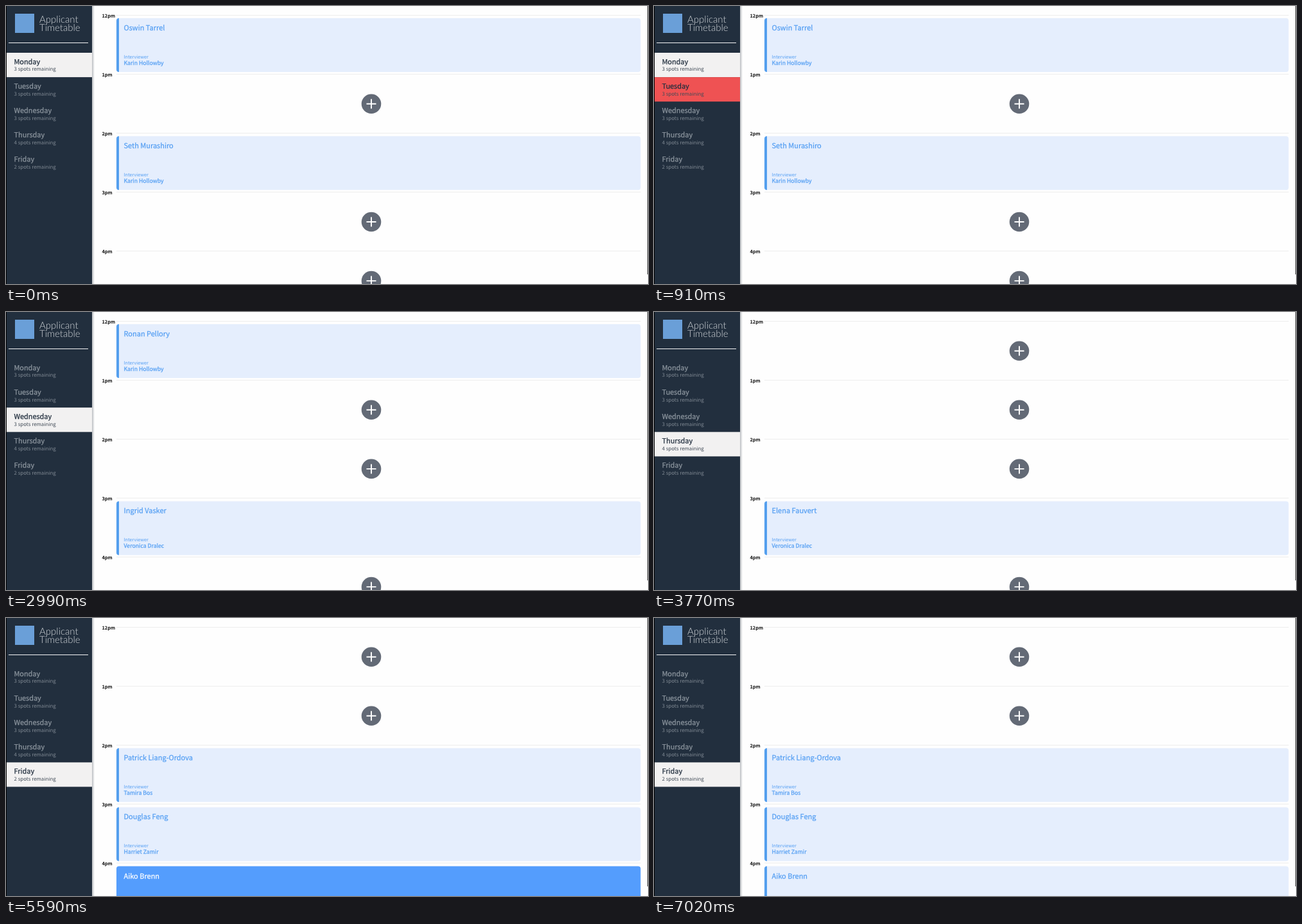
Recreate the animation shown at these times as an HTML page. Size 1000 by 434 pixels, loop 8840 ms.

```html
<!DOCTYPE html>
<html lang="en">
<head>
<meta charset="utf-8">
<title>Appointment planner</title>
<style>
  html, body { margin: 0; width: 100%; height: 100%; overflow: hidden; background: #fefefe; }
  svg { display: block; width: 100%; height: 100%; }
  text {
    font-family: "Noto Sans CJK JP", "Noto Sans CJK SC", "Noto Sans CJK", "Open Sans", sans-serif;
    text-rendering: geometricPrecision;
  }
  .medium { stroke: currentColor; stroke-width: 0.25px; }
  .brand { font-family: Lato, "Open Sans", sans-serif; font-weight: 300; }
</style>
</head>
<body>
<svg id="stage" viewBox="0 0 1000 434"></svg>
<script>
const LOOP = 8840;
const SLOT_PITCH = 92.1;
const DAY_PITCH = 38.1;
const HOURS = ["12pm", "1pm", "2pm", "3pm", "4pm"];
const KARIN = "Karin Hollowby", VERONICA = "Veronica Dralec";

// Bookings are keyed by slot index: [guest, interviewer].
const DAYS = [
  { name: "Monday", spots: 3, booked: { 0: ["Oswin Tarrel", KARIN], 2: ["Seth Murashiro", KARIN] } },
  { name: "Tuesday", spots: 3, booked: { 1: ["Kareem Tolby", VERONICA], 4: ["Barnaby Copples", VERONICA] } },
  { name: "Wednesday", spots: 3, booked: { 0: ["Ronan Pellory", KARIN], 3: ["Ingrid Vasker", VERONICA] } },
  { name: "Thursday", spots: 4, booked: { 3: ["Elena Fauvert", VERONICA] } },
  { name: "Friday", spots: 2, booked: {
    2: ["Patrick Liang-Ordova", "Tamira Bos"],
    3: ["Douglas Feng", "Harriet Zamir"],
    4: ["Aiko Brenn", "Harriet Zamir"] } }
];

// Each state holds until the next one starts.
const STATES = [
  { at: 0, day: 0 },
  { at: 780, day: 0, hoverDay: 1, tint: 0.5 },
  { at: 910, day: 0, hoverDay: 1 },
  { at: 2080, day: 1 },
  { at: 2470, day: 1, hoverDay: 2 },
  { at: 2990, day: 2 },
  { at: 3380, day: 2, hoverDay: 3 },
  { at: 3770, day: 3 },
  { at: 4290, day: 3, hoverDay: 4 },
  { at: 4810, day: 4 },
  { at: 5200, day: 4, hoverCard: 2 },
  { at: 5460, day: 4, hoverCard: 3 },
  { at: 5590, day: 4, hoverCard: 4 },
  { at: 6110, day: 4, hoverCard: 3 },
  { at: 6240, day: 4, hoverCard: 2 },
  { at: 6630, day: 4 }
];

const rect = (x, y, w, h, fill, extra = "") =>
  `<rect x="${x}" y="${y}" width="${w}" height="${h}" fill="${fill}" ${extra}/>`;
const text = (x, y, size, color, content, extra = "") =>
  `<text x="${x}" y="${y}" font-size="${size}" color="${color}" fill="${color}" ${extra}>${content}</text>`;
const path = (d, stroke, width) =>
  `<path d="${d}" fill="none" stroke="${stroke}" stroke-width="${width}" stroke-linejoin="round"/>`;
const MEDIUM = 'class="medium"', BRAND = 'class="brand"', BOLD = 'font-weight="700"';

function dayItem(day, index, state) {
  const y = 73 + index * DAY_PITCH;
  const selected = index === state.day;
  const hovered = index === state.hoverDay;
  const background = selected ? rect(1, y, 133, DAY_PITCH, "#f2f1f1")
    : hovered ? rect(1, y, 133, DAY_PITCH, "#ef5253", `opacity="${state.tint ?? 1}"`) : "";
  const active = selected || hovered;
  return background +
    text(12.5, y + 17.8, 10.9, active ? "#222f3e" : "#8d969f", day.name, MEDIUM) +
    text(12.5, y + 28.4, 7.9, active ? "#414b57" : "#808a94", `${day.spots} spots remaining`);
}

function sidebar(state) {
  return rect(134, 0, 4, 434, "url(#shade)") +
    rect(0, 0, 1, 434, "#000") +
    rect(1, 0, 133, 434, "#222f3e") +
    rect(14, 12, 30, 30, "#6a9fd8") +
    text(52, 25.5, 15, "#d3d7db", "Applicant", BRAND) +
    text(52, 39, 15, "#d3d7db", "Timetable", BRAND) +
    rect(4, 57, 124, 1, "#f4f5f6") +
    DAYS.map((day, i) => dayItem(day, i, state)).join("");
}

function plusButton(y) {
  return `<circle cx="569" cy="${y}" r="15.3" fill="#636a76"/>` +
    path(`M561.5 ${y}h15M569 ${y - 7.5}v15`, "#fff", 1.9);
}

function cardActions(y) {
  return path(`M958 ${y + 62.5}h-7v10h10v-5M954.5 ${y + 69}l.5-2.5 6.5-6 1.5 1.5-6.5 6.5z`, "#c5dfff", 1.1) +
    path(`M967 ${y + 62.5}h10M970 ${y + 62}v-1.5h4v1.5M968 ${y + 63}v9.5h8v-9.5M970.5 ${y + 65}v5M973.5 ${y + 65}v5`, "#c5dfff", 1);
}

function card([guest, interviewer], y, hovered) {
  const ink = hovered ? "#fff" : "#559ff3";
  const shape = rect(172, y, 816.5, 84, hovered ? "#549dfd" : "#e5eefd", 'rx="4"');
  const edge = hovered ? "" : `<path d="M176 ${y}a4 4 0 0 0-4 4v76a4 4 0 0 0 4 4z" fill="#549fee"/>`;
  return shape + edge +
    text(183.5, y + 19, 11, ink, guest, MEDIUM) +
    text(183.5, y + 62.6, 7.2, ink, "Interviewer") +
    text(183.5, y + 72.6, 8.7, ink, interviewer, MEDIUM) +
    (hovered ? cardActions(y) : "");
}

function slot(hour, index, state) {
  const top = 14.5 + index * SLOT_PITCH;
  const booking = DAYS[state.day].booked[index];
  return text(149.5, top + 3.2, 7.4, "#111", hour, BOLD) +
    rect(172, Math.floor(top), 816.5, 1, "#ededed") +
    (booking ? card(booking, top + 4.6, index === state.hoverCard) : plusButton(top + 46.2));
}

const shade = `<defs><linearGradient id="shade">
  <stop stop-color="#b9bcc0"/><stop offset="1" stop-color="#fefefe"/></linearGradient></defs>`;
const stage = document.getElementById("stage");
let shown;

function frame(now) {
  const time = now % LOOP;
  const state = STATES.findLast(s => s.at <= time);
  if (state !== shown) {
    shown = state;
    stage.innerHTML = shade + rect(0, 0, 1000, 434, "#fefefe") +
      HOURS.map((hour, i) => slot(hour, i, state)).join("") +
      sidebar(state) + rect(999, 0, 1, 419, "#4a4a4a");
  }
  requestAnimationFrame(frame);
}
frame(0);
</script>
</body>
</html>
```
